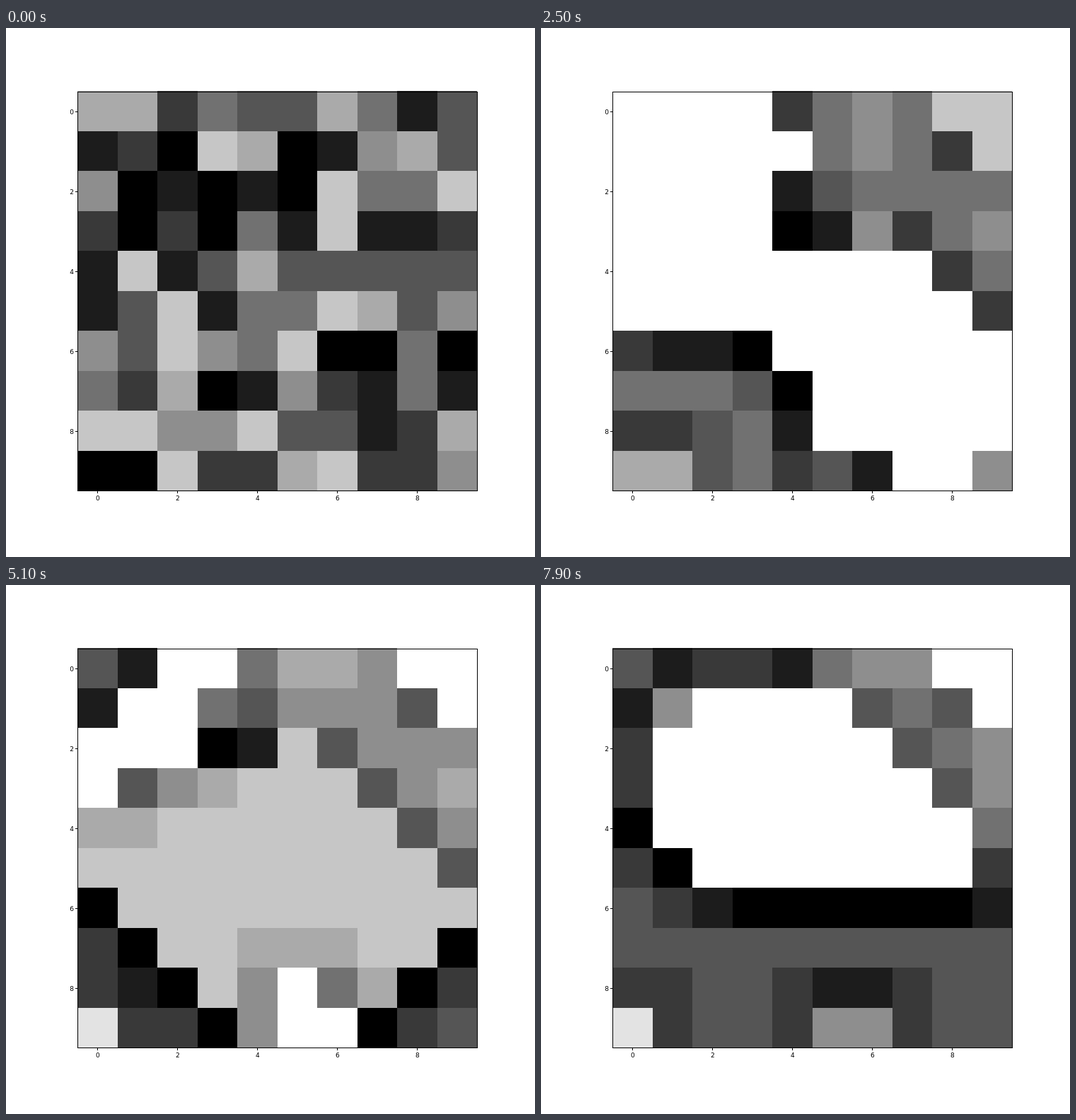
Animation, 748 px wide and 748 px high, one loop 8 s. Source, as an HTML page:

```html
<!DOCTYPE html>
<html lang="en">
<head>
<meta charset="utf-8">
<title>Flashing grid</title>
<style>
  html, body { margin: 0; width: 100%; height: 100%; overflow: hidden; background: #fff; }
  svg { display: block; width: 748px; height: 748px; }
  text { font: 9px "DejaVu Sans", sans-serif; text-anchor: middle; }
  path, rect { shape-rendering: crispEdges; }
  path { fill: none; stroke: #000; }
</style>
</head>
<body>
<svg viewBox="0 0 748 748">
  <g id="cells"></g>
  <path d="M101.5 90.5H666.5V654.5H101.5Z"/>
  <g id="axes"></g>
</svg>
<script>
const SIZE = 10, PITCH = 56.5, STEP_MS = 100, STEPS = 80;
const start = [
  "3375663586", "8792398436", "4989892552", "7979582887", "8286366666",
  "8628552364", "4624529959", "5739847858", "2244266873", "9927732774"
].join("").split("").map(Number);

function add(parent, tag, attrs, label = "") {
  const node = document.createElementNS("http://www.w3.org/2000/svg", tag);
  for (const key in attrs) node.setAttribute(key, attrs[key]);
  node.textContent = label;
  return document.getElementById(parent).appendChild(node);
}

// Every cell gains one; a cell above 9 flashes, charges its neighbours and resets.
function advance(grid) {
  const next = grid.slice();
  const charge = i => {
    if (++next[i] !== 10) return;
    const x = i % SIZE, y = Math.floor(i / SIZE);
    for (let r = Math.max(0, y - 1); r <= Math.min(SIZE - 1, y + 1); r++)
      for (let c = Math.max(0, x - 1); c <= Math.min(SIZE - 1, x + 1); c++)
        if (r !== y || c !== x) charge(r * SIZE + c);
  };
  grid.forEach((_, i) => charge(i));
  return next.map(v => v > 9 ? 0 : v);
}

const states = [start];
while (states.length < STEPS) states.push(advance(states[states.length - 1]));

const left = i => Math.round(101 + PITCH * i);
const top_ = i => Math.floor(89.7 + PITCH * i);
const cells = start.map((_, i) => {
  const c = i % SIZE, r = Math.floor(i / SIZE);
  return add("cells", "rect", {
    x: left(c), y: top_(r),
    width: left(c + 1) - left(c), height: top_(r + 1) - top_(r)
  });
});

for (let n = 0; n < SIZE; n += 2) {
  const x = 101.5 + PITCH * (n + 0.5), y = 90 + PITCH * (n + 0.5);
  add("axes", "path", { d: `M${Math.floor(x) + 0.5} 655v3M98 ${Math.floor(y) + 0.5}h3` });
  add("axes", "text", { x, y: 667.5 }, n);
  add("axes", "text", { x: 93, y: y + 3.3 }, n);
}

let shown = -1;
function draw() {
  const step = Math.floor(performance.now() / STEP_MS) % STEPS;
  if (step !== shown) {
    shown = step;
    states[step].forEach((v, i) => {
      const grey = Math.round(255 * (9 - v) / 9);
      cells[i].setAttribute("fill", `rgb(${grey},${grey},${grey})`);
    });
  }
  requestAnimationFrame(draw);
}
draw();
</script>
</body>
</html>
```
